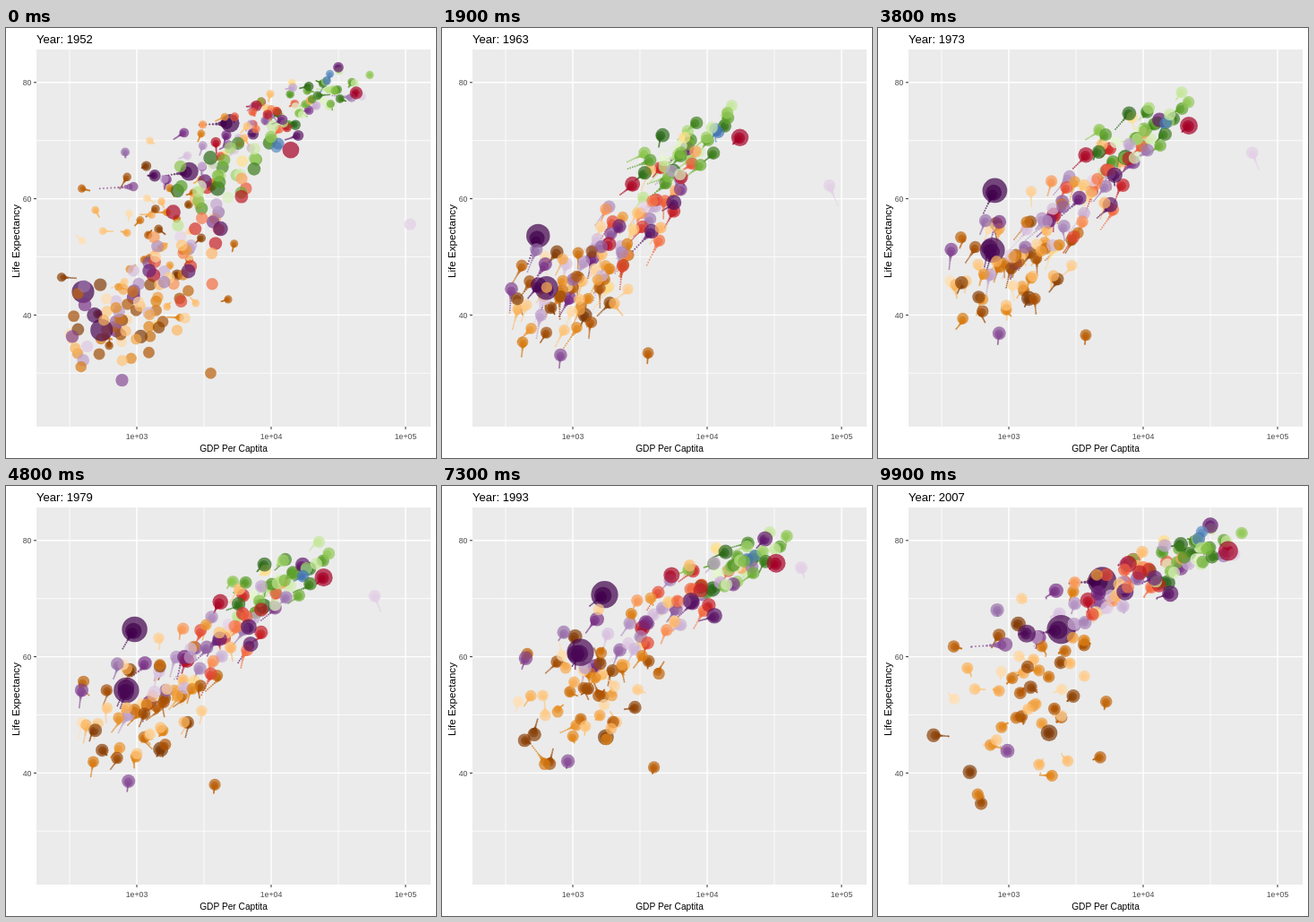
Recreate the animation shown at these times as an HTML page. Size 480 px wide and 480 px high, loop 10000 ms.

```html
<!DOCTYPE html>
<html lang="en">
<head>
<meta charset="utf-8">
<title>Life expectancy and GDP</title>
<style>
  html, body { margin: 0; width: 100%; height: 100%; overflow: hidden; background: #fff; }
  svg { display: block; width: 100vw; height: 100vh; }
  text { font-family: "Liberation Sans", Arial, sans-serif; }
  .tick { font-size: 8.8px; fill: #4d4d4d; }
</style>
</head>
<body>
<svg id="stage" viewBox="0 0 480 480">
  <clipPath id="panel"><rect x="34" y="24" width="440" height="421"/></clipPath>
  <rect width="480" height="480" fill="#fff"/>
  <rect x="34" y="24" width="440" height="421" fill="#ebebeb"/>
  <g id="grid"></g>
  <g id="dots" clip-path="url(#panel)" fill-opacity=".7"></g>
  <text id="year" x="34" y="17" font-size="13.1"></text>
  <text x="254" y="473" font-size="10.2" text-anchor="middle">GDP Per Captita</text>
  <text transform="translate(15 238) rotate(-90)" font-size="11.6" text-anchor="middle">Life Expectancy</text>
</svg>
<script>
const FRAMES = 100, FRAME_MS = 100, WAKE = 10, KNOTS = 12;
const byId = id => document.getElementById(id);
const fract = v => v - Math.floor(v);
const clamp01 = v => Math.max(0, Math.min(1, v));
const mix = (a, b, t) => a + (b - a) * t;
const ease = (t, bend) => 1 - (1 - t) ** bend;
const px = logGdp => 146 + (logGdp - 3) * 150;
const py = life => 60.8 + (80 - life) * 6.49;

// Linear interpolation through evenly spaced values, t in 0..1.
function curve(values, t) {
  const p = t * (values.length - 1);
  const i = Math.min(Math.floor(p), values.length - 2);
  return mix(values[i], values[i + 1], p - i);
}

function add(parent, tag, attrs, text) {
  const el = document.createElementNS('http://www.w3.org/2000/svg', tag);
  for (const key in attrs) el.setAttribute(key, attrs[key]);
  if (text) el.textContent = text;
  return parent.appendChild(el);
}

// from, to: mean [log10 gdp, life]; bend: easing power of each.
// spread: deviation of each at start and end; link: their correlation.
// leaders: the few dots that stand out, keyed by population rank.
const regions = [
  { count: 52, order: .5, colors: ['7f3b08', 'b35806', 'e08214', 'fdb863', 'fee0b6'],
    from: [2.97, 39.3], to: [3.2, 57.5], bend: [1.5, 1.6], spread: [[.29, .37], [5, 7.5]],
    link: .5, top: 150, decay: .9, share: .28, setback: 11,
    leaders: {
      0: { from: [3.03, 36.3], to: [3.3, 46.9], bend: [1.2, 2] },
      3: { from: [2.89, 39.1], to: [2.44, 46.5], bend: [.6, 1.6] },
      15: { from: [3.55, 30], to: [3.68, 42.7], bend: [.4, 1.5] }
    } },
  { count: 25, order: .95, colors: ['a50026', 'd73027', 'f46d43', 'fdae61', 'fee090'],
    from: [3.46, 52.8], to: [3.92, 73.4], bend: [1.4, 1.4], spread: [[.24, .27], [8.5, 3.6]],
    link: .75, top: 310, decay: 1.1, share: .5,
    leaders: { 0: { from: [4.146, 68.4], to: [4.633, 78.2], bend: [1.05, 1.15] } } },
  { count: 33, order: .1, colors: ['40004b', '762a83', '9970ab', 'c2a5cf', 'e7d4e8'],
    from: [3.13, 46.8], to: [3.77, 71], bend: [1.3, 1.4], spread: [[.36, .52], [8.3, 5.3]],
    link: .85, top: 660, decay: 1, share: .43, giants: 1250,
    leaders: {
      0: { from: [2.6, 44], to: [3.695, 73], bend: [.65, 1.9] },
      1: { from: [2.738, 37.4], to: [3.39, 64.7], bend: [.5, 1.45] },
      5: { from: [3.507, 63], to: [4.5, 82.6], bend: [2, 1.6] },
      11: { from: [2.52, 36.3], to: [2.975, 62.1], bend: [.25, 1.8] },
      12: { from: [2.89, 28.8], to: [2.99, 43.8], bend: [1, 1.6] },
      31: { from: [5.034, 55.6], to: [4.675, 77.6], bend: [2, 1.7] }
    } },
  { count: 30, order: .3, colors: ['276419', '4d9221', '7fbc41', 'b8e186', 'e6f5d0'],
    from: [3.68, 64.8], to: [4.36, 77.6], bend: [1.4, 1.6], spread: [[.25, .25], [5, 2.8]],
    link: .78, top: 100, decay: .7, share: .8, leaders: {} },
  { count: 2, order: .7, colors: ['4575b4', '5b8cc0'],
    from: [4.02, 69.2], to: [4.48, 80.6], bend: [1, .9], spread: [[.01, .05], [.2, .4]],
    link: 0, top: 20, decay: 1, share: .45, leaders: {} }
];

function shade(colors, u) {
  const channel = at => curve(colors.map(c => parseInt(c.slice(at, at + 2), 16)), u);
  return `rgb(${[0, 2, 4].map(at => Math.round(channel(at)))})`;
}

// Well spread, roughly normal deviates: powers of one irrational ratio.
function deviate(i, axis) {
  const u = .02 + .96 * fract(.5 + i * .8567 ** (axis + 1));
  return Math.log(u / (1 - u)) / 1.75;
}
const jitter = seed => fract(Math.sin(seed * 12.9898) * 43758.5453) - .5;

const trend = ({ from, to, bend }, t) => from.map((v, i) => mix(v, to[i], ease(t, bend[i])));

// A dot keeps much of its relative standing, drifts a little and wobbles.
function scatterPath(region, i) {
  const { link, spread } = region, [a, b, c, d] = [0, 1, 2, 3].map(axis => deviate(i, axis));
  const rest = Math.sqrt(1 - link * link);
  const wealth = [a, .85 * a + .53 * c];
  const health = [link * a + rest * b, link * wealth[1] + rest * (.8 * b + .6 * d)];
  const loss = region.setback && i % 3 === 0 ? region.setback : 0;
  return (t, knot) => {
    const [gdp, life] = trend(region, t);
    const seed = i * 31 + knot + region.order * 97;
    const sd = spread.map(ends => mix(...ends, t));
    return [
      gdp + mix(...wealth, t) * sd[0] + .09 * jitter(seed),
      Math.min(82, life + mix(...health, t) * sd[1] + 1.4 * jitter(seed + .37) - loss * clamp01((t - .65) * 4))
    ];
  };
}

function makeDot(region, rank) {
  const leader = region.leaders[rank];
  const path = leader ? t => trend(leader, t) : scatterPath(region, rank + 1);
  const knots = Array.from({ length: KNOTS }, (_, k) => path(k / (KNOTS - 1), k));
  const people = region.giants && rank < 2 ? region.giants : region.top / (rank + 1) ** region.decay;
  return {
    xs: knots.map(k => px(k[0])),
    ys: knots.map(k => py(k[1])),
    radii: [region.share, 1].map(s => 5.8 + .29 * Math.sqrt(people * s)),
    color: shade(region.colors, rank / (region.count - 1)),
    order: fract(region.order + rank * .618)
  };
}

const dots = regions
  .flatMap(region => Array.from({ length: region.count }, (_, rank) => makeDot(region, rank)))
  .sort((a, b) => a.order - b.order);

const grid = byId('grid');
function gridLine(d, stroke, width) {
  add(grid, 'path', { d, stroke, 'stroke-width': width });
}
for (const half of [2.5, 3.5, 4.5]) gridLine(`M${px(half)} 24V445`, '#fff', .8);
for (const half of [30, 50, 70]) gridLine(`M34 ${py(half)}H474`, '#fff', .8);
for (const power of [3, 4, 5]) {
  const x = px(power);
  gridLine(`M${x} 24V445`, '#fff', 1.4);
  gridLine(`M${x} 445v3`, '#333', 1);
  add(grid, 'text', { x, y: 459, class: 'tick', 'text-anchor': 'middle' }, `1e+0${power}`);
}
for (const life of [40, 60, 80]) {
  const y = py(life);
  gridLine(`M34 ${y}H474`, '#fff', 1.4);
  gridLine(`M31 ${y}h3`, '#333', 1);
  add(grid, 'text', { x: 28.5, y: y + 3.5, class: 'tick', 'text-anchor': 'end' }, String(life));
}

// Oldest wake layer lies at the bottom, the current dots on top.
const layers = [];
for (let age = WAKE; age >= 0; age--) {
  const circles = dots.map(dot => add(byId('dots'), 'circle', { fill: dot.color }));
  layers.push({ age, circles, scale: (1 - age / WAKE) ** 4.5 });
}

function draw(frame) {
  byId('year').textContent = 'Year: ' + Math.round(1952 + 55 * frame / (FRAMES - 1));
  for (const { age, circles, scale } of layers) {
    const t = (frame - age + FRAMES) % FRAMES / (FRAMES - 1);
    dots.forEach((dot, i) => {
      const circle = circles[i];
      circle.setAttribute('cx', curve(dot.xs, t).toFixed(2));
      circle.setAttribute('cy', curve(dot.ys, t).toFixed(2));
      circle.setAttribute('r', mix(.95, curve(dot.radii, t), scale).toFixed(2));
    });
  }
}

const start = performance.now();
let shown = -1;
function tick() {
  const frame = Math.floor((performance.now() - start) / FRAME_MS) % FRAMES;
  if (frame !== shown) draw(shown = frame);
  requestAnimationFrame(tick);
}
tick();
</script>
</body>
</html>
```
